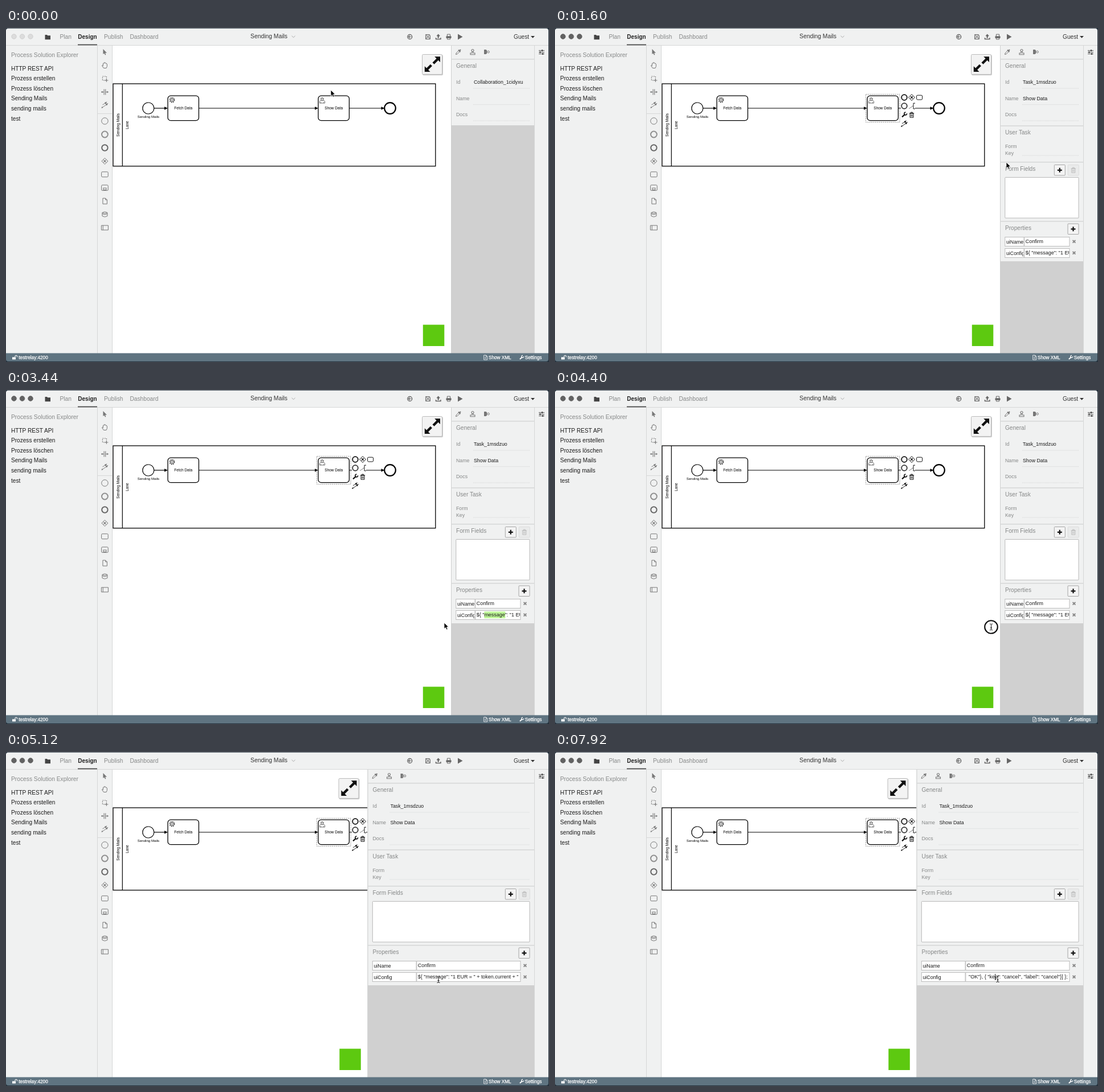
An HTML page for the animation above (8 s loop, 953 by 587 pixels).

```html
<!DOCTYPE html>
<html lang="en">
<head>
<meta charset="utf-8">
<title>Process designer</title>
<style>
html, body { margin: 0; width: 100%; height: 100%; overflow: hidden; background: #fff; }
#stage { display: block; width: 953px; height: 587px; font-family: "Liberation Sans", Arial, sans-serif; }
text { white-space: pre; }
</style>
</head>
<body>
<svg id="stage" viewBox="0 0 953 587">
  <g id="canvas"></g>
  <g id="float"></g>
  <g id="panel"></g>
  <g id="frame"></g>
  <g id="lights"></g>
  <circle id="ring" r="11.3" fill="none" stroke="#0c0c0c" stroke-width="2.1"/>
  <g id="pointer"></g>
</svg>
<script>
const LOOP = 8000, STEP = 80, EDGE = 781, DRAG = 146.5, RIGHT = 919;
const BG = '#f0f1f1', LINE = '#d6d7d7', GREY = '#868888', INK = '#1c1c1c', ICON = '#777', MARK = '#bff798';
const $ = id => document.getElementById(id);

// Markup helpers
const text = (x, y, s, size = 10.2, fill = INK, extra = '') =>
  `<text x="${x}" y="${y}" font-size="${size}" fill="${fill}" ${extra}>${s}</text>`;
const box = (x, y, w, h, fill = 'none', stroke = 'none', sw = 1, extra = '') =>
  `<rect x="${x}" y="${y}" width="${w}" height="${h}" fill="${fill}" stroke="${stroke}" stroke-width="${sw}" ${extra}/>`;
const path = (d, stroke = ICON, sw = 1, fill = 'none', extra = '') =>
  `<path d="${d}" fill="${fill}" stroke="${stroke}" stroke-width="${sw}" ${extra}/>`;
const solid = (d, fill = ICON) => path(d, 'none', 0, fill);
const circle = (x, y, r, stroke = ICON, sw = 1, fill = 'none', extra = '') =>
  `<circle cx="${x}" cy="${y}" r="${r}" fill="${fill}" stroke="${stroke}" stroke-width="${sw}" ${extra}/>`;
const at = (x, y, s, scale = 1) => `<g transform="translate(${x} ${y}) scale(${scale})">${s}</g>`;
const clip = (x, y, w, h, s) =>
  `<svg x="${x}" y="${y}" width="${w}" height="${h}" viewBox="${x} ${y} ${w} ${h}">${s}</svg>`;

// Icons centred on 0,0
const gateway = c => path('M0-5.5L5.5 0L0 5.5L-5.5 0Z', c) + path('M-2-2L2 2M2-2L-2 2', c, 1.1);
const connect = c => path('M-5 5L4-1M-4 0L1-3', c, .9) + solid('M6-3L1.5-1.5L3.5 1.4ZM4-5.5L-.5-4L1.5-1ZM-6 6L-4.8 3L-3 5Z', c);
const trash = c => path('M-3-2.5H3V4.5H-3ZM-4.2-2.8H4.2M-1.5-3V-4.6H1.5V-3M-1-.8V3M1-.8V3', c, 1);
const wrench = c => path('M-4 3.8L1.2-.6', c, 2.2) + path('M4.6-2.2A2.4 2.4 0 1 1 2.4-4.4', c, 1.6);
const plus = c => path('M-4 0H4M0-4V4', c, 2.2);
const cross = path('M-2.4-2.4L2.4 2.4M2.4-2.4L-2.4 2.4', '#858585', 1.8);
const docIcon = c => path('M-3.5-5H1.2L4-2.2V5H-3.5ZM1.2-5V-2.2H4', c);

const arrow = (x1, x2, y) => path(`M${x1} ${y}H${x2 - 4}`, '#000', 1.2) +
  solid(`M${x2} ${y}L${x2 - 6} ${y - 2.8}V${y + 2.8}Z`, '#000');
const task = (x, label) => box(x, 119.2, 54.4, 43.4, '#fff', '#000', 1.3, 'rx="5"') +
  text(x + 27.2, 143, label, 6.5, '#000', 'text-anchor="middle"');
const upright = (x, y, s) => text(0, 0, s, 6.5, '#000',
  `text-anchor="middle" transform="translate(${x} ${y}) rotate(-90)"`);

function diagram() {
  return box(187, 31, 740, 541, '#fff') +
    box(188, 98, 565.8, 144.8, '#fff', '#000', 1.3) + path('M204.3 98V243', '#000', 1.2) +
    upright(198.6, 170.5, 'Sending Mails') + upright(214.6, 170.5, 'Lane') +
    circle(249.8, 141, 10, '#000', 1.2) + text(250, 157.6, 'Sending Mails', 6.1, '#000', 'text-anchor="middle"') +
    arrow(260, 284, 141) + task(284, 'Fetch Data') + arrow(338.5, 548, 141) +
    task(548, 'Show Data') + arrow(602.5, 664.5, 141) + circle(674, 141, 9.8, '#000', 2.2) +
    at(291.5, 126.5, circle(0, 0, 4, '#333', 1.8, 'none', 'stroke-dasharray="1.6 1.55"') +
      circle(0, 0, 3.1, '#333', .7) + circle(0, 0, 1.3, '#333', .7)) +
    at(555, 127, path('M-4.6 5V2.2Q-4 .4-1.6 .2H1.6Q4 .4 4.6 2.2V5Z', '#333', .7, '#fff') +
      circle(0, -2.2, 2.4, '#333', .7, '#fff') + path('M-2.3-2.4Q0-3.4 2.3-2.4M-2.5 3V5M2.5 3V5', '#333', .6));
}

function contextPad() {
  const c = '#111';
  return box(545.5, 116.5, 59.5, 49, 'none', '#888', .9, 'stroke-dasharray="2 1.4"') +
    box(607, 131, 25, 28, '#fff') + circle(613, 122, 4.8, c, 1.8) + at(626, 122, gateway(c)) +
    box(634.6, 118.2, 10, 7.8, '#fff', c, 1, 'rx="1.8"') +
    circle(613, 137, 4.8, '#333', 1.8) +
    path('M632 132.2H629V142H632', c, 1) + path('M628 137L621 142', c, 1, 'none', 'stroke-dasharray="1.5 1.2"') +
    at(613, 152.5, wrench(c)) + at(626, 152.7, trash(c)) + at(613, 168, connect(c));
}

function floating() {
  return box(731, 47.2, 36, 36, '#ccc', 'none', 0, 'rx="2"') + box(730.5, 46.5, 35, 35, '#f3f3f3', '#bbb', 1, 'rx="2"') +
    path('M750 62.2L758 54.2M746.4 65.2L738.4 73.2', '#111', 4.4) +
    solid('M762 50.2V60L752.2 50.2ZM734.8 77V67.2L744.6 77Z', '#111') +
    box(731.8, 521.5, 37.5, 37.5, '#5dc910');
}

function field(x, y, label, value, lineY = y + 8) {
  return text(x + 9, y, label, 8.8, GREY) +
    clip(x + 40, y - 10, 86 + EDGE - x, 14, text(x + 40, y, value, 8.8)) +
    path(`M${x + 39} ${lineY}H${RIGHT}`, '#d3d4d4', 1, 'none', 'stroke-dasharray="1 1"');
}

const button = (x, y, icon, off) =>
  box(x, y, 19, 18.5, off ? '#eaebeb' : '#f4f4f4', off ? '#dcdcdc' : '#a4a4a4', 1, 'rx="1"') + at(x + 9.5, y + 9.3, icon);

function property(x, y, name, value) {
  const left = x + 8.8, split = left + (903 - left) * .297;
  return box(left, y, split - left - .4, 16, '#fff', '#bcbcbc') + box(split + .4, y, 902.5 - split, 16, '#fff', '#bcbcbc') +
    clip(left + 1, y, split - left - 2.4, 16, text(left + 2.2, y + 11, name, 8.75)) +
    clip(split + 1, y, 901 - split, 16, value(split + 2.4)) + at(911, y + 7.8, cross);
}

// mark: 0 none, 1 one word, 2 everything visible; ended: field scrolled to its end
function config(mark, ended, caret) {
  return x => {
    if (ended) return text(726, 398.4, '"OK"}, { "key": "cancel", "label": "cancel"}] };', 9.1) +
      (caret ? path('M772.6 390V401', '#111', 1) : '');
    const glow = mark == 1 ? box(x + 13.5, 389.3, 37, 12, MARK) : mark ? box(x, 389.3, 901 - x, 12, MARK) : '';
    return glow + text(x, 398.4, '${ "message": "1 EUR = " + token.current + "', 8.95);
  };
}

function panel(x, s) {
  const rule = y => path(`M${x} ${y}H927`, LINE, 1.6);
  const head = (y, label) => text(x + 9, y, label, 10.1, GREY);
  const out = box(x, 31, 927 - x, 541, '#d0d0d0') + box(x, 31, 927 - x, s.picked ? 379 : 140, BG) +
    path(`M${x + .5} 31V572`, '#cfd0d0') + rule(54.8) +
    at(x + 13, 42, path('M-4.5 4.5L-3.8 2L.8-2.6L2.6-.8L-2 3.8Z', ICON, 1) + path('M0-3.5L3.5 0M1.5-1.5L4-4', ICON, 2)) +
    at(x + 38, 42, circle(0, -2.5, 2, ICON, 1.1) + path('M-1 0V2H-4V4.8H4V2H1V0', ICON, 1.1)) +
    at(x + 62.5, 42, box(-4.5, -4, 4, 8, ICON) + path('M0-3V3', ICON) + circle(3, 0, 1.8)) +
    head(70, 'General') +
    field(x, 98, 'Id', s.picked ? 'Task_1msdzuo' : 'Collaboration_1cidyxu') +
    field(x, 126.6, 'Name', s.picked ? 'Show Data' : '') + field(x, 155, 'Docs', '');
  if (!s.picked) return out;
  return out + rule(172) + head(187.4, 'User Task') +
    text(x + 9, 211, 'Form', 8.8, GREY) + field(x, 223, 'Key', '', 224) +
    rule(235.8) + head(251, 'Form Fields') +
    button(876.3, 240.5, plus('#111')) + button(900.3, 240.5, trash('#bbb'), true) +
    box(x + 8.8, 262.5, RIGHT - x - 8.8, 71.5, '#fff', '#b8b8b8', 1, 'rx="1"') +
    rule(339.8) + head(355, 'Properties') + button(900, 344, plus('#111')) +
    property(x, 367.5, 'uiName', v => text(v, 378.4, 'Confirm', 8.9)) +
    property(x, 387.5, 'uiConfig', config(s.mark, s.ended, s.caret));
}

function palette() {
  const icons = [
    [42, solid('M-3-5V4L-1 2.4L.6 5.6L2 5L.6 1.8H3.6Z')],
    [65.5, path('M-2 5L-5 .5Q-4.6-.8-3 .8V-3Q-2.2-4.6-1.4-3V-4.4Q-.4-5.8.4-4.4V-4Q1.4-5 2.2-3.6V-2.6Q3.6-3.6 4-2V2L2.6 5Z')],
    [89, path('M-4-4H3V3H-4Z', ICON, 1.1, 'none', 'stroke-dasharray="2 1.5"') + path('M0 3H6M3 0V6', ICON)],
    [112.5, path('M-1.3-5V5M1.3-5V5M-6 0H-2M2 0H6', ICON, 1.1) + solid('M-6.5 0L-4-2V2ZM6.5 0L4-2V2Z')],
    [135, connect(ICON)],
    [163.5, circle(0, 0, 5.7)],
    [187, circle(0, 0, 5.4, '#909090', 2)],
    [210.5, circle(0, 0, 5.2, '#666', 2)],
    [234, gateway(ICON)],
    [257.3, box(-5.8, -4.5, 11.6, 9, 'none', ICON, 1, 'rx="1.6"')],
    [280.8, box(-5.8, -4.8, 11.6, 9.6, 'none', ICON, 1, 'rx="1.6"') + box(-2.5, .4, 5, 3.2, 'none', ICON)],
    [304.2, docIcon(ICON)],
    [327.5, path('M-4.5-3V3Q0 6 4.5 3V-3Q0-6-4.5-3Q0 0 4.5-3M-4.5-1Q0 2 4.5-1', ICON)],
    [351, path('M-6-4H6V4H-6ZM-3.2-4V4', ICON)]
  ];
  return icons.map(([y, s]) => at(173.4, y, s)).join('') + path('M161 150.5H187', LINE);
}

function toolbar() {
  const c = '#666';
  return solid('M68.5 12H72L73 13.2H78V20.2H68.5Z', '#444') +
    text(94.5, 19, 'Plan', 10.2, GREY) + text(126.3, 19, 'Design', 10, '#222', 'font-weight="bold"') +
    text(172, 19, 'Publish', 10.2, GREY) + text(217.5, 19, 'Dashboard', 10.2, GREY) +
    box(126, 28.6, 34, 1.7, '#4a4a4a') +
    text(429, 18.4, 'Sending Mails', 10.35, '#333') + path('M501.5 13.8L504.5 16.6L507.5 13.8', '#aaa') +
    circle(708.7, 15.5, 4, c, 1.3) + path('M711.5 15.5H706.5M708.6 13.2L706.3 15.5L708.6 17.8', c, 1.2) +
    at(740.5, 15.5, path('M-4-4H2.6L4-2.6V4H-4ZM-2-4V-1H2V-4M-2.4 4V1H2.4V4', c)) +
    at(758.7, 15.5, solid('M0-5L3.4-1.2H1.2V2H-1.2V-1.2H-3.4Z', c) + path('M-4.2 1.5V4H4.2V1.5', c, 1.5)) +
    at(777, 15.5, path('M-2.6-1V-4.4H2.6V-1M-2.6 2V4.4H2.6V2', c) + box(-4.5, -1.2, 9, 3.6, c)) +
    solid('M793 10.5L801.5 15.5L793 20.5Z', c) +
    text(891, 18.7, 'Guest', 10.2, '#333') + solid('M921 14H928L924.5 17.8Z', '#333');
}

function footer() {
  const label = (x, s) => text(x, 582, s, 8.2, '#fff', 'stroke="#fff" stroke-width=".25"');
  return box(0, 571.5, 953, 15.5, '#5f7481') +
    at(15, 579, box(-4, -.5, 6, 4, '#fff') + path('M1-.5V-2.4Q2.8-5 4.5-2.4V-.5', '#fff', 1.1)) +
    label(22.3, 'testrelay:4200') +
    at(841.5, 579, docIcon('#fff') + path('M-1.5 0H2M-1.5 2H2', '#fff', .8), .8) + label(847, 'Show XML') +
    at(905, 579, wrench('#fff'), .8) + label(910.8, 'Settings');
}

function chrome() {
  const explorer = ['HTTP REST API', 'Prozess erstellen', 'Prozess löschen', 'Sending Mails', 'sending mails', 'test'];
  return box(0, 0, 953, 30.5, BG) + box(0, 30, 187, 542, BG) + box(927, 30, 26, 542, BG) +
    path('M0 30.5H952M160.5 31V572M186.5 31V572M927.5 31V572', LINE) +
    toolbar() +
    path('M935 39.5H945M935 42.5H945M935 45.5H945', '#555') + path('M941 38V41M937.5 41V44M942 44V47', '#333', 1.6) +
    text(9, 51, 'Process Solution Explorer', 10.25, GREY) +
    explorer.map((s, i) => text(9, 74.5 + i * 17.6, s, 10.1)).join('') +
    palette() + footer() +
    // desktop showing around the rounded window
    path('M0 0H953V587H0ZM4 .8H948Q952 .8 952 4.8V582Q952 586 948 586H4Q0 586 0 582V4.8Q0 .8 4 .8Z',
      'none', 0, '#25313c', 'fill-rule="evenodd"');
}

const ARROW = path('M0 0V10.6L2.5 8.4L4.3 12.3L6.2 11.4L4.5 7.7H7.8Z', '#fff', .8, '#000');
const STEM = 'M-2.5-5.5Q0-5.5 0-4V4Q0 5.5-2.5 5.5M2.5-5.5Q0-5.5 0-4M0 4Q0 5.5 2.5 5.5M-1.5 1.5H1.5';
const BEAM = path(STEM, '#fff', 1.6) + path(STEM, '#111', 1);

// Pointer stops: time, x, y
const STOPS = [
  [0, 570, 109], [80, 570, 109], [400, 578, 132], [640, 578, 132], [1600, 792, 236], [1840, 792, 236],
  [2400, 850, 395], [2960, 850, 395], [3360, 769, 409], [3600, 769, 409], [4240, 765.5, 416.5], [4400, 765.5, 416.5],
  [4800, 619.5, 416.5], [5040, 759, 400], [7360, 759, 400], [7600, 777, 399], [LOOP, 777, 399]
];
const CLICKS = [[400, 560], [2640, 2800], [4320, 4800], [5360, 5520], [7600, 7760]];
const within = (t, a, b) => t >= a && t < b;
const ease = k => k * k * (3 - 2 * k);

function pointerAt(t) {
  const i = STOPS.findIndex(s => s[0] > t);
  const [t0, x0, y0] = STOPS[i - 1], [t1, x1, y1] = STOPS[i];
  const k = ease((t - t0) / (t1 - t0));
  return [x0 + (x1 - x0) * k, y0 + (y1 - y0) * k];
}

// Rebuild a group only when its state changes
const last = {};
function fill(id, key, make) {
  if (last[id] === key) return;
  last[id] = key;
  $(id).innerHTML = make();
}

function draw(t) {
  const edge = EDGE - DRAG * ease(Math.min(1, Math.max(0, (t - 4400) / 400)));
  const state = {
    picked: t >= 480,
    mark: within(t, 2720, 4320) ? 1 : within(t, 6080, 7120) ? 2 : 0,
    ended: t >= 7120,
    caret: t >= 7760
  };
  fill('canvas', state.picked, () => diagram() + (state.picked ? contextPad() : ''));
  fill('panel', edge + JSON.stringify(state), () => panel(edge, state));
  $('float').setAttribute('transform', `translate(${edge - EDGE} 0)`);
  fill('lights', state.picked, () => [14, 28.5, 43].map(x =>
    state.picked ? circle(x, 15, 4.4, '#575757', .6, '#626262') : circle(x, 15, 4.2, '#c9c9c9', .8, '#dcdcdc')).join(''));

  const [x, y] = pointerAt(t);
  const beam = within(t, 2400, 3040) || t >= 4240;
  fill('pointer', beam, () => beam ? BEAM : ARROW);
  $('pointer').setAttribute('transform', `translate(${x} ${y})`);
  $('ring').setAttribute('transform', `translate(${x} ${y})`);
  $('ring').style.display = CLICKS.some(c => within(t, ...c)) ? '' : 'none';
}

$('float').innerHTML = floating();
$('frame').innerHTML = chrome();
const start = performance.now();
function tick() {
  const t = (performance.now() - start) % LOOP;
  draw(Math.floor(t / STEP) * STEP);
  requestAnimationFrame(tick);
}
tick();
</script>
</body>
</html>
```
